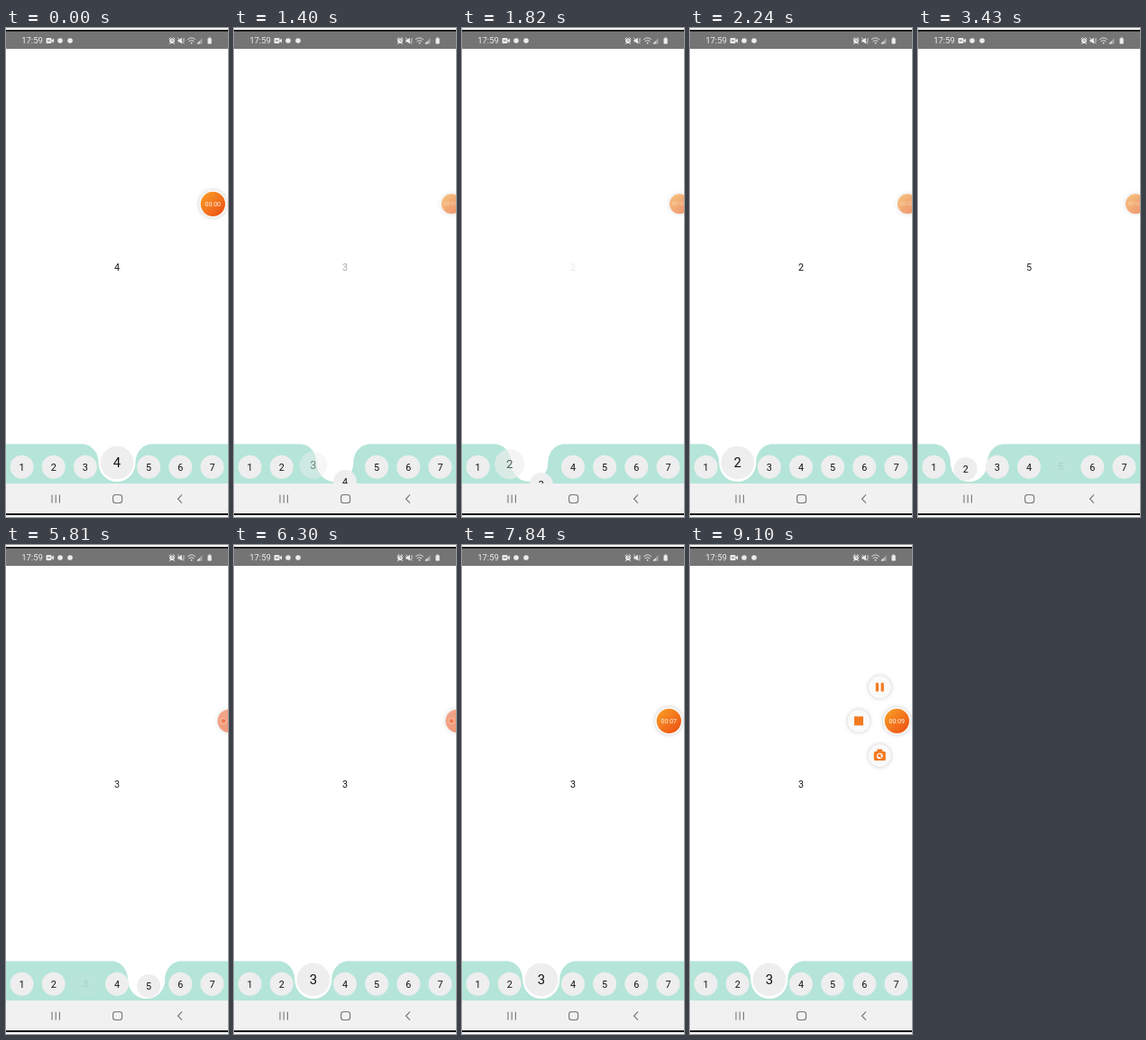
An HTML page with a canvas that plays this animation: 246 px wide and 540 px high, repeating every 9.59 s.

```html
<!DOCTYPE html>
<html lang="en">
<head>
<meta charset="utf-8">
<title>Curved navigation bar</title>
<style>
  html, body { margin: 0; width: 100%; height: 100%; overflow: hidden; background: #fff; }
  canvas { display: block; width: 246px; height: 540px; }
</style>
</head>
<body>
<canvas id="stage"></canvas>
<script>
const W = 246, H = 540, LOOP = 9590, SLIDE = 500;
const canvas = document.getElementById('stage');
const ctx = canvas.getContext('2d');
const dpr = window.devicePixelRatio || 1;
canvas.width = W * dpr;
canvas.height = H * dpr;

const BAR_TOP = 459.5, BAR_BOTTOM = 503;
const taps = [
  { at: 1243, from: 4, to: 3 },
  { at: 1547, from: 3, to: 2 },
  { at: 3413, from: 2, to: 5 },
  { at: 5793, from: 5, to: 3 }
];
const ticks = [1190, 2240, 3430, 4760, 5810, 6930, 7420, 7980, 8960];

const clamp = v => Math.max(0, Math.min(1, v));
const lerp = (a, b, p) => a + (b - a) * p;
const slotX = n => (n - 0.5) * W / 7;

function rect(x, y, w, h, fill) {
  ctx.fillStyle = fill;
  ctx.fillRect(x, y, w, h);
}

function disc(x, y, r, fill) {
  ctx.fillStyle = fill;
  ctx.beginPath();
  ctx.arc(x, y, r, 0, Math.PI * 2);
  ctx.fill();
}

function label(text, x, y, size, color = '#111') {
  ctx.font = `${size}px Roboto, sans-serif`;
  ctx.textAlign = 'center';
  ctx.textBaseline = 'alphabetic';
  ctx.fillStyle = color;
  ctx.fillText(text, x, y + size * 0.36);
}

function stroke(path, color, width) {
  ctx.strokeStyle = color;
  ctx.lineWidth = width;
  ctx.stroke(new Path2D(path));
}

function fillPath(path, color) {
  ctx.fillStyle = color;
  ctx.fill(new Path2D(path));
}

function roundRect(x, y, w, h, r, fill) {
  ctx.beginPath();
  ctx.roundRect(x, y, w, h, r);
  ctx.fillStyle = fill;
  ctx.fill();
}

// Notch position and running transition; a new tap starts from wherever the notch is.
function navState(t) {
  let x = slotX(4), selected = 4, previous = 4, p = 1;
  taps.forEach((tap, i) => {
    if (t < tap.at) return;
    const next = taps[i + 1];
    const until = next ? Math.min(t, next.at) : t;
    p = clamp((until - tap.at) / SLIDE);
    x = lerp(x, slotX(tap.to), p);
    selected = tap.to;
    previous = tap.from;
  });
  return { x, selected, previous, p };
}

function drawStatusBar() {
  rect(0, 2, W, 2, '#000');
  rect(0, 3.7, W, 19.3, '#747474');
  const ink = '#ececec';
  label('17:59', 29, 14, 9.5, ink);

  roundRect(44.5, 11, 6, 6, 1, ink);
  fillPath('M50 14 l3 -2.5 v5 z', ink);
  rect(46.2, 13.4, 2.6, 1.2, '#747474');
  disc(60, 14, 2.8, ink);
  disc(71, 14, 2.8, ink);

  ctx.lineCap = 'round';
  disc(184, 14.2, 2.8, ink);
  stroke('M181 12 l1.5 -1.4 M187 12 l-1.5 -1.4 M182 17 l-.7 .8 M186 17 l.7 .8', ink, 0.9);
  stroke('M184 12.7 v1.7 h1.2', '#747474', 0.7);
  fillPath('M190.5 12.7 h1.8 l2.6 -2 v6.8 l-2.6 -2 h-1.8 z', ink);
  stroke('M190.5 10.8 l6.5 6.5 M197 11.5 v4', ink, 0.8);
  stroke('M201.5 12.5 q4 -3.4 8 0 M203 14.5 q2.5 -2 5 0', ink, 0.9);
  disc(205.6, 16.6, 0.9, ink);
  fillPath('M211.5 17.5 l6 -6.5 v6.5 z', '#a5a5a5');
  fillPath('M211.5 17.5 l3 -3.25 v3.25 z', ink);
  roundRect(223.5, 11.3, 4.2, 6.2, 0.8, ink);
  rect(224.7, 10.4, 1.8, 1, ink);
}

function drawSystemNav() {
  rect(0, BAR_BOTTOM, W, 33, '#f1f1f1');
  rect(0, 536, W, 2, '#000');
  ctx.lineCap = 'butt';
  stroke('M51 515.5 v9 M55.2 515.5 v9 M59.4 515.5 v9', '#777', 1.1);
  ctx.beginPath();
  ctx.roundRect(118.6, 515.5, 10, 9, 2.7);
  ctx.stroke();
  stroke('M195 515.3 l-4.5 4.7 l4.5 4.7', '#777', 1.1);
}

function drawBar(x) {
  const mid = 480.5, r = 20.5, k = 11.3;
  ctx.beginPath();
  ctx.moveTo(0, BAR_TOP);
  ctx.lineTo(x - 39, BAR_TOP);
  ctx.bezierCurveTo(x - 39 + k, BAR_TOP, x - r, mid - k, x - r, mid);
  ctx.arc(x, mid, r, Math.PI, 0, true);
  ctx.bezierCurveTo(x + r, mid - k, x + 39 - k, BAR_TOP, x + 39, BAR_TOP);
  ctx.lineTo(W, BAR_TOP);
  ctx.lineTo(W, BAR_BOTTOM);
  ctx.lineTo(0, BAR_BOTTOM);
  ctx.fillStyle = '#b4e5d8';
  ctx.fill();
}

function drawItems({ selected, previous, p }) {
  const appear = p ** 0.7;
  for (let n = 1; n <= 7; n++) {
    const grow = n === selected ? appear : 0;
    const sink = n === previous && n !== selected ? 19.5 * Math.sin(Math.PI * p) : 0;
    const y = 484.7 - 4.7 * grow + sink;
    ctx.globalAlpha = n === selected ? appear : 1;
    disc(slotX(n), y, 13 + 5.3 * grow, '#eee');
    label(n, slotX(n), y, 10.8 + 4 * grow);
  }
  ctx.globalAlpha = 1;
}

function shadowDisc(x, y, r) {
  ctx.save();
  ctx.shadowColor = 'rgba(0,0,0,.22)';
  ctx.shadowBlur = 4 * dpr;
  disc(x, y, r, '#fafafa');
  ctx.restore();
}

function drawMenu(open) {
  const hub = [229, 194], orange = '#f47a20';
  const place = (x, y, icon) => {
    ctx.save();
    ctx.translate(lerp(hub[0], x, open), lerp(hub[1], y, open));
    shadowDisc(0, 0, 12.5);
    icon();
    ctx.restore();
  };
  place(210.3, 157, () => {
    rect(-4.5, -4.7, 3.2, 9.4, orange);
    rect(1.3, -4.7, 3.2, 9.4, orange);
  });
  place(187, 194.3, () => rect(-5, -5, 10, 10, orange));
  place(210.3, 232.5, () => {
    roundRect(-6.5, -4.5, 13, 10, 1.5, orange);
    roundRect(-3, -7, 6, 4, 1, orange);
    disc(0, 0.5, 3.3, '#fff');
    disc(-0.4, 0.1, 1.8, orange);
    stroke('M.8 1.3 l1.8 1.8', orange, 1.1);
  });
}

function gradientDisc(x, y, r, from, to) {
  const fill = ctx.createLinearGradient(x - r, y - r, x + r, y + r);
  fill.addColorStop(0.1, from);
  fill.addColorStop(0.9, to);
  disc(x, y, r, fill);
}

// The recorder bubble: out in full colour, docked at the edge, or tucked halfway behind it.
function drawRecorder(t) {
  const y = 194.3;
  const time = '00:0' + ticks.filter(at => t >= at).length;
  if (t >= 1190 && t < 4760) {
    ctx.globalAlpha = 0.58;
    shadowDisc(241, y, 11.6);
    gradientDisc(241, y, 11, '#f99a25', '#ee5415');
    label(time, 240, y, 5.8, '#fff3e5');
  } else if (t >= 4760 && t < 7840) {
    ctx.globalAlpha = 0.58;
    shadowDisc(247.5, y, 13.6);
    gradientDisc(247.5, y, 13, '#f4703c', '#ee5420');
    disc(241, y, 3.6, '#fbd0bb');
    disc(241, y, 2.4, '#ec4a1c');
  } else {
    if (t >= 7980) drawMenu(t < 8050 ? 0.6 : 1);
    shadowDisc(229.3, y, 15.3);
    gradientDisc(229.3, y, 13.6, '#f99a25', '#ee5415');
    label(time, 229.3, y, 7, '#fff3e5');
  }
  ctx.globalAlpha = 1;
}

function draw(now) {
  const t = now % LOOP;
  const nav = navState(t);
  ctx.setTransform(dpr, 0, 0, dpr, 0, 0);
  rect(0, 0, W, H, '#fff');

  ctx.globalAlpha = Math.abs(1 - 2 * nav.p);
  label(nav.selected, 123, 263.8, 10.8);
  ctx.globalAlpha = 1;

  drawBar(nav.x);
  drawItems(nav);
  drawSystemNav();
  drawStatusBar();
  drawRecorder(t);
}

const start = performance.now();
function frame() {
  draw(performance.now() - start);
  requestAnimationFrame(frame);
}
frame();
</script>
</body>
</html>
```
